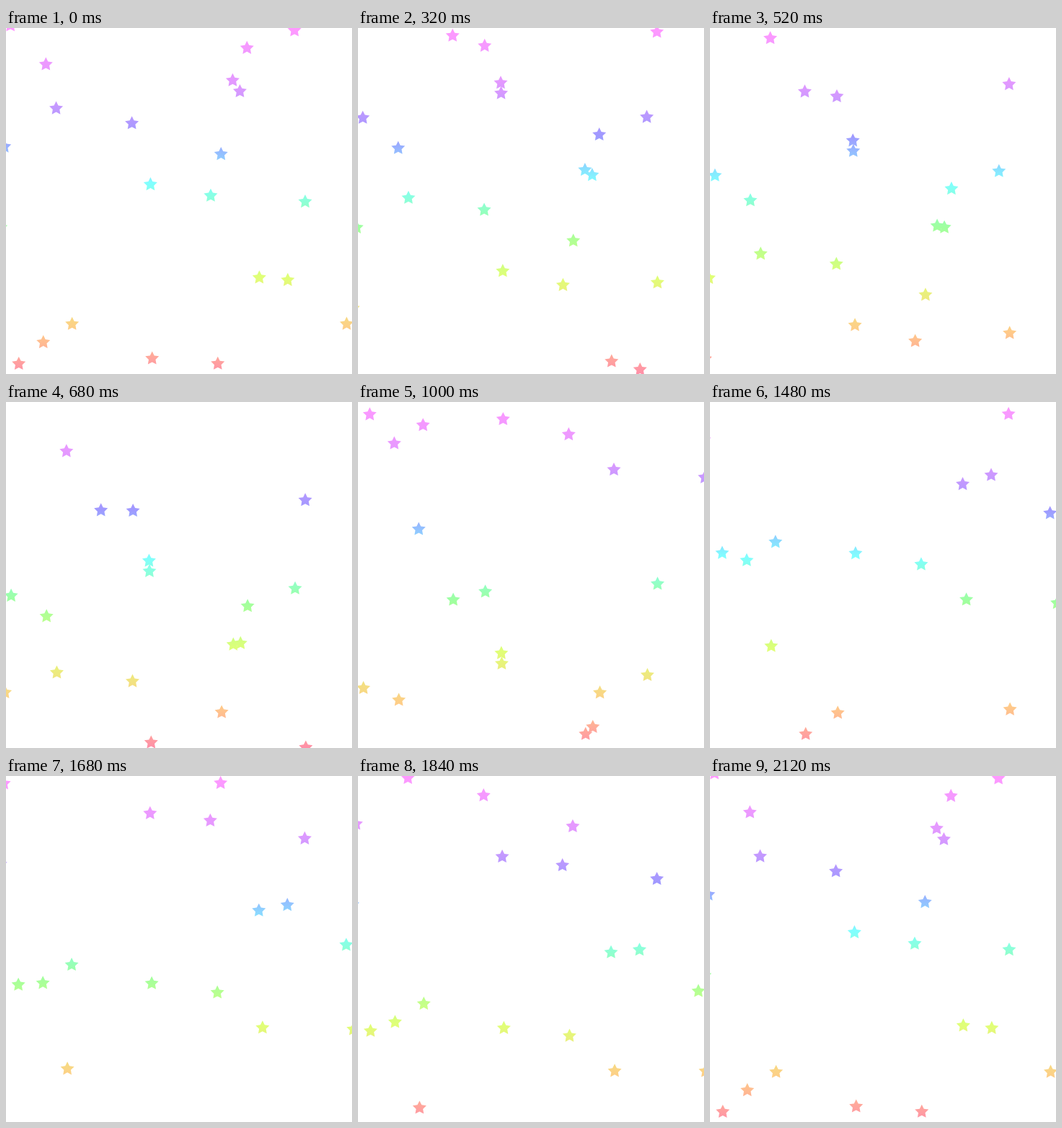
Write an HTML page with a canvas that moves like this. It is 480 px wide and 480 px high and loops after 2160 ms.

```html
<!DOCTYPE html>
<html lang="en">
<head>
<meta charset="utf-8">
<title>Falling stars</title>
<style>
html, body { margin: 0; width: 100%; height: 100%; overflow: hidden; background: #fff; }
canvas { display: block; }
</style>
</head>
<body>
<canvas width="480" height="480"></canvas>
<script>
const SIZE = 480, LOOP = 2160, STEP = 40, CYCLE = 2120;
const RADIUS = 10, INNER = 0.5, DRIFT = 0.0013;
const ctx = document.querySelector('canvas').getContext('2d');

// Layers from slowest to fastest; each star is [x, ms] where and when it crosses mid-height.
const layers = [
  [[91, 1615], [51, 1540], [84.5, 1188]],
  [[-2, 215], [415, 2117], [-7.5, 2015], [176.5, 934]],
  [[325, 419], [56, 522], [351, 1827], [481.5, 1373], [415.5, 966]],
  [[335, 565], [175, 287], [401, 630], [298.5, 173], [200.5, 61], [355.5, 1389], [293, 1519]],
  [[315, 431], [70, 331], [284, 19], [390.5, 1837], [202, 1557], [132, 911]],
  [[7, 608], [472, 1694], [17, 1556], [198.5, 729], [199, 693]]
];
const speed = layer => 0.338 + 0.0125 * layer; // px per ms

// The rainbow is fixed to the stage; stars pass through it.
const rainbow = ctx.createLinearGradient(0, 0, 0, SIZE);
[
  [0, '#ff99ff'], [75, '#e399ff'], [150, '#9f99ff'], [215, '#80ffff'],
  [276, '#9fff9f'], [345, '#e0ff77'], [420, '#ffcc88'], [480, '#ff8fa8']
].forEach(([y, color]) => rainbow.addColorStop(y / SIZE, color));

// Signed time since the nearest crossing.
const sinceCrossing = ms => ms - CYCLE * Math.round(ms / CYCLE);

function drawStar(x, y) {
  ctx.beginPath();
  for (let i = 0; i < 10; i++) {
    const r = i % 2 ? RADIUS * INNER : RADIUS, a = i * Math.PI / 5;
    ctx.lineTo(x + r * Math.sin(a), y - r * Math.cos(a));
  }
  ctx.fill();
}

function draw(now) {
  const t = Math.floor(now % LOOP / STEP) * STEP;
  ctx.fillStyle = '#fff';
  ctx.fillRect(0, 0, SIZE, SIZE);
  ctx.fillStyle = rainbow;
  layers.forEach((stars, layer) => {
    for (const [x, crossing] of stars) {
      const dt = sinceCrossing(t - crossing);
      drawStar(x + DRIFT * dt, SIZE / 2 + speed(layer) * dt);
    }
  });
  requestAnimationFrame(draw);
}
requestAnimationFrame(draw);
</script>
</body>
</html>
```
